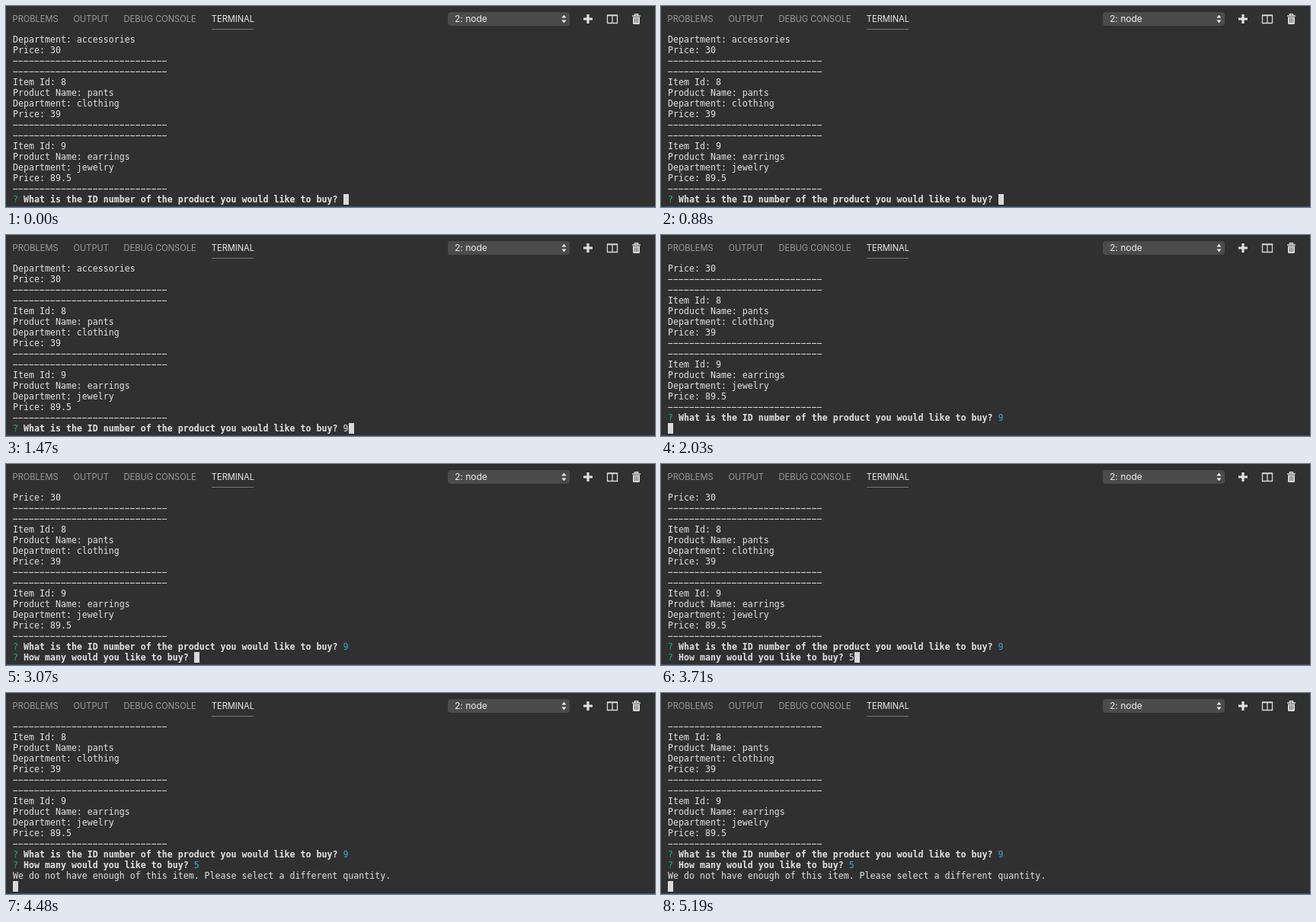
Write an HTML page that moves like this. It is 852 px wide and 264 px high and loops after 5.67 s.

```html
<!DOCTYPE html>
<html lang="en">
<head>
<meta charset="utf-8">
<title>Terminal</title>
<style>
  html, body { margin: 0; width: 100%; height: 100%; overflow: hidden; background: #303030; }
  #stage { position: relative; width: 852px; height: 264px; overflow: hidden; background: #303030; }
  svg { position: absolute; left: 0; top: 0; font-family: Inter, Roboto, sans-serif; }
  #log {
    position: absolute; left: 9px; top: 37px; margin: 0; color: #e2e2e2;
    font: 11.627px/14px "DejaVu Sans Mono", monospace; white-space: pre;
  }
  #log div { height: 14px; }
  #log i { font-style: normal; color: #18b57b; }
  #log b { font-weight: bold; }
  #log u { text-decoration: none; color: #35a9dc; }
  #cursor { position: absolute; top: 247px; width: 7px; height: 14px; background: #dadada; }
</style>
</head>
<body>
<div id="stage">
  <svg width="852" height="264" viewBox="0 0 852 264">
    <g font-size="11.1" fill="#9c9c9c">
      <text x="8.6" y="21">PROBLEMS</text>
      <text x="88.6" y="21">OUTPUT</text>
      <text x="154.6" y="21">DEBUG CONSOLE</text>
      <text x="269.8" y="21" fill="#ececec">TERMINAL</text>
    </g>
    <rect x="270" y="30" width="55" height="1" fill="#777"/>
    <rect x="580" y="8" width="160" height="18" rx="4" fill="#4b4b4b"/>
    <text x="589" y="21" font-size="12" fill="#f0f0f0">2: node</text>
    <path d="M729.5 15.6l3-3.8 3 3.8zM729.5 18.4l3 3.8 3-3.8z" fill="#f0f0f0"/>
    <path d="M758 17h12M764 11v12" stroke="#e0e0e0" stroke-width="3.2"/>
    <path d="M789.5 12.5h13v10h-13zM796 12v10M789 12h14" fill="none" stroke="#d8d8d8" stroke-width="1.3"/>
    <path d="M822 13h11M825.5 12.5v-1.8h4v1.8" fill="none" stroke="#d8d8d8" stroke-width="1.5"/>
    <path d="M823 14.5h9v8q0 1.5-1.5 1.5h-6q-1.5 0-1.5-1.5z" fill="#d8d8d8"/>
    <path d="M825.5 16v6M827.5 16v6M829.5 16v6" stroke="#555" stroke-width=".8"/>
    <rect y="263" width="852" height="1" fill="#2d527f"/>
  </svg>
  <div id="log"></div>
  <div id="cursor"></div>
</div>
<script>
  const LOOP = 5670, ROWS = 16, CELL = 7, LEFT = 9;
  const rule = "\u2212".repeat(29);
  const item = (id, name, dept, price) => [
    rule, "Item Id: " + id, "Product Name: " + name,
    "Department: " + dept, "Price: " + price, rule
  ];
  const history = [
    "Department: accessories", "Price: 30", rule,
    ...item(8, "pants", "clothing", 39),
    ...item(9, "earrings", "jewelry", 89.5)
  ];
  const ask = (text, reply = "") => `<i>?</i> <b>${text}</b> ${reply}`;
  const done = (text, reply) => ask(text, `<u>${reply}</u>`);
  const pick = "What is the ID number of the product you would like to buy?";
  const count = "How many would you like to buy?";
  const sorry = "We do not have enough of this item. Please select a different quantity.";

  // start time, lines after the history
  const steps = [
    [0, [ask(pick)]],
    [1470, [ask(pick, "9")]],
    [2030, [done(pick, 9), ""]],
    [2100, [done(pick, 9), ask(count)]],
    [3710, [done(pick, 9), ask(count, "5")]],
    [4480, [done(pick, 9), done(count, 5), sorry, ""]]
  ];

  const log = document.getElementById("log");
  const cursor = document.getElementById("cursor");
  let shown = null;

  function show(step) {
    const lines = [...history, ...step[1]].slice(-ROWS);
    log.innerHTML = lines.map(line => `<div>${line}</div>`).join("");
    cursor.style.left = LEFT + CELL * log.lastChild.textContent.length + "px";
    shown = step;
  }

  function tick() {
    const t = performance.now() % LOOP;
    const step = steps.findLast(([start]) => start <= t);
    if (step !== shown) show(step);
    requestAnimationFrame(tick);
  }
  tick();
</script>
</body>
</html>
```
